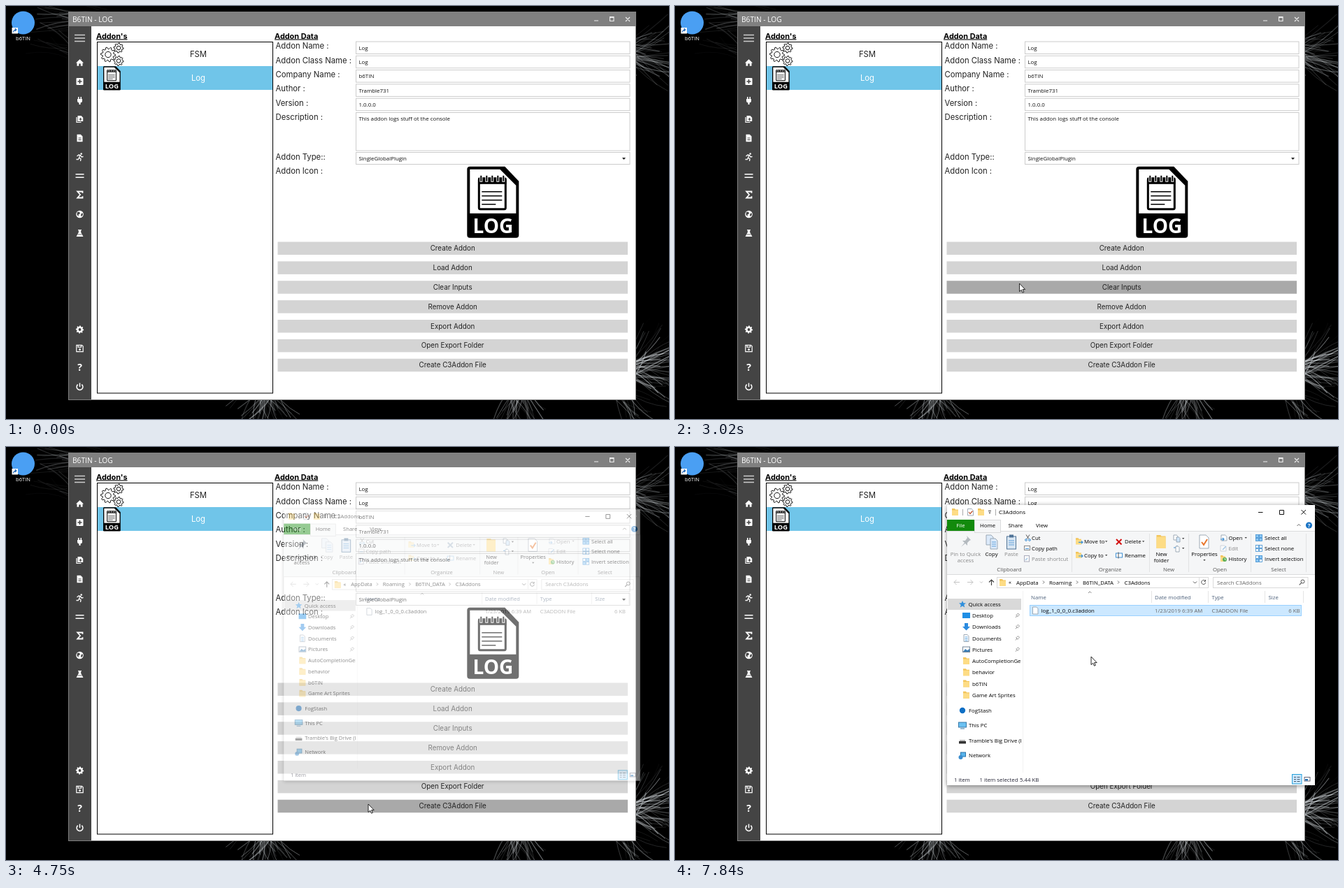
An HTML page with a canvas for the animation above (8000 ms loop, 948 by 591 pixels).

```html
<!DOCTYPE html>
<html lang="en">
<head>
<meta charset="utf-8">
<title>Addon export</title>
<style>
html,body{margin:0;width:100%;height:100%;overflow:hidden;background:#000}
canvas,svg{position:absolute;left:0;top:0}
text{font-family:"Open Sans","Noto Sans",sans-serif;white-space:pre}
svg{font-size:7.8px}
.form text{font-family:Inter,Lato,sans-serif;font-size:11.3px;fill:#222}
.form .btn{font-size:9.8px}
.form .head{font-size:10.9px;font-weight:700;text-decoration:underline;fill:#000}
.field text{font-size:7.9px;fill:#111}
.m{text-anchor:middle}
.e{text-anchor:end}
.dim,.on,.sel .off{opacity:.45}
.sel .on{opacity:1}
.cross{stroke:#4d7295}
.sel .cross{stroke:#d31111}
.frame{filter:drop-shadow(0 1px 3px rgba(0,0,0,.45))}
</style>
</head>
<body>
<canvas id="wall" width="948" height="591"></canvas>
<svg id="stage" width="948" height="591" viewBox="0 0 948 591"></svg>
<script>
const $ = id => document.getElementById(id);
const text = (x, y, s, o = '') => `<text x="${x}" y="${y}" ${o}>${s}</text>`;
const rect = (x, y, w, h, fill, o = '') => `<rect x="${x}" y="${y}" width="${w}" height="${h}" fill="${fill}" ${o}/>`;
const fill = (d, c, o = '') => `<path d="${d}" fill="${c}" ${o}/>`;
const line = (d, c, w = 1, o = '') => `<path d="${d}" fill="none" stroke="${c}" stroke-width="${w}" ${o}/>`;
const circle = (x, y, r, c, o = '') => `<circle cx="${x}" cy="${y}" r="${r}" fill="${c}" ${o}/>`;
const group = (s, o = '') => `<g ${o}>${s}</g>`;
const mid = 'class="m"';

function gear(x, y, r, teeth) {
  let d = '';
  for (let i = 0; i < teeth * 4; i++) {
    const a = i * Math.PI / 2 / teeth, q = i % 4 < 2 ? r : r * .76;
    d += (i ? 'L' : 'M') + (x + q * Math.cos(a)).toFixed(1) + ' ' + (y + q * Math.sin(a)).toFixed(1);
  }
  return d + 'Z';
}

// Wallpaper: fans of thin pale filaments
function drawWall() {
  const c = $('wall').getContext('2d');
  let seed = 7;
  const rnd = () => (seed = seed * 16807 % 2147483647) / 2147483647;
  const fan = (x, y, angle, spread, n, len, alpha) => {
    for (let i = 0; i < n; i++) {
      const a = angle + (rnd() - .5) * spread, l = len * (.4 + .6 * rnd());
      const b = a + (rnd() - .5) * .7, sx = x + (rnd() - .5) * 24, sy = y + (rnd() - .5) * 24;
      c.strokeStyle = `rgba(222,228,232,${alpha * rnd()})`;
      c.lineWidth = .4 + rnd();
      c.beginPath();
      c.moveTo(sx, sy);
      c.quadraticCurveTo(sx + l * .5 * Math.cos(b), sy + l * .5 * Math.sin(b), sx + l * Math.cos(a), sy + l * Math.sin(a));
      c.stroke();
    }
  };
  fan(135, 14, 3.2, .5, 30, 100, .25);
  fan(98, 65, 3.5, .9, 14, 70, .14);
  fan(885, 65, .1, 1.6, 60, 80, .36);
  fan(888, 520, -.2, 1.9, 70, 90, .55);
  fan(370, 548, 1.57, 2, 60, 62, .5);
  fan(730, 548, 1.4, 1.7, 45, 60, .45);
  fan(880, 555, .8, 1.2, 25, 65, .4);
}

const logIcon = fill('M4 0H54L74 21V98Q74 102 70 102H4Q0 102 0 98V4Q0 0 4 0Z', '#000') +
  fill('M4 4H47L70 27V67H4Z', '#fff') +
  rect(17, 17, 38, 44, '#fff', 'rx="2" stroke="#000" stroke-width="3"') +
  rect(16, 16, 40, 9, '#000') +
  line('M20 13v9M28 13v9M36 13v9M44 13v9M52 13v9', '#fff', 4) +
  line('M20 13v8M28 13v8M36 13v8M44 13v8M52 13v8', '#000', 2) +
  line('M21 36h29M21 42h29M21 48h29M21 54h20', '#000', 1.6) +
  text(37, 95.5, 'LOG', 'class="m" style="font-size:28px;font-weight:700;fill:#fff"');

function sidebar() {
  const W = '#fff', D = '#444';
  const icons = [
    [46, line('M-7.5-4.5h15M-7.5 0h15M-7.5 4.5h15', '#ccc', 1.5)],
    [81, fill('M-5.5.5L0-4.7 5.5.5H4V4.7H1.3V1.5H-1.3V4.7H-4V.5Z', W)],
    [108, rect(-5, -5, 10, 10, W, 'rx="1"') + line('M-3 0H3M0-3V3', D, 1.6)],
    [135, fill('M-3.5-2H3.5V1Q3.5 3 1 3.5V6H-1V3.5Q-3.5 3-3.5 1ZM-2.5-5H-1V-2H-2.5ZM1-5H2.5V-2H1Z', W)],
    [162, line('M-4.5-3V4.5H2', W, 1.2) + fill('M-3-5H2L4.7-2.3V3H-3Z', W) + line('M-1 0H3M1-2V2', D, 1.2)],
    [189, fill('M-4-5.3H1.2L4-2.5V5.3H-4Z', W) + line('M-2 0H2M-2 2.5H2', D)],
    [216, circle(2.2, -4.5, 1.3, W) + line('M-4-1L-1.5-3 1-2.5 2.5 0 5-.5M.5-2.5L-1 1 1.5 2.8 1 6M-1 1.5L-2.3 3.5H-5', W, 1.3)],
    [243, line('M-6-2.2H6M-6 2.2H6', W, 1.6)],
    [270, line('M4-2.3V-4.5H-3.3L.6 0-3.3 4.5H4V2.3', W, 1.8)],
    [298, circle(0, 0, 5.3, W) + fill('M-3.8-3L-.5-3.5.5-1-2 .5-1.5 3-4 1ZM2-1L4.5-1.5 4 2 1.5 3Z', D)],
    [325, fill('M-2.5-5H2.5V-4H1.7V-1L5 5H-5L-1.7-1V-4H-2.5Z', W) + line('M-3 2H3', D, .8)],
    [463, fill(gear(0, 0, 5.7, 8), W) + circle(0, 0, 1.9, D)],
    [490, line('M-4.7-4.7H3L4.7-3V4.7H-4.7ZM-2.5-4.5V-1.8H2V-4.5', W, 1.2) + circle(0, 1.6, 1.5, W)],
    [517, text(0, 5, '?', 'class="m" style="font-size:14px;font-weight:700" fill="#fff"')],
    [545, line('M-2.8-3.3A4.4 4.4 0 1 0 2.8-3.3M0-5.5V0', W, 1.5)]
  ];
  return rect(90, 29, 32, 534, D) + icons.map(([y, s]) => group(s, `transform="translate(105.5 ${y})"`)).join('');
}

const buttonTop = i => 337.5 + i * 27.87;

function appWindow() {
  const labels = ['Addon Name :', 'Addon Class Name :', 'Company Name :', 'Author :', 'Version :', 'Description :'];
  const values = ['Log', 'Log', 'b6TIN', 'Tramble731', '1.0.0.0', 'This addon logs stuff ot the console'];
  const buttons = ['Create Addon', 'Load Addon', 'Clear Inputs', 'Remove Addon', 'Export Addon', 'Open Export Folder', 'Create C3Addon File'];
  const box = (y, h) => rect(500.5, y, 391.5, h, '#fff', 'stroke="#ccc"');
  const form = text(129, 46.5, "Addon's", 'class="head"') + text(384, 46.5, 'Addon Data', 'class="head"') +
    labels.map((s, i) => text(385.5, 61.3 + i * 20.3, s)).join('') +
    text(385.5, 219.8, 'Addon Type::') + text(385.5, 240, 'Addon Icon :') +
    text(275, 73, 'FSM', mid) + text(275, 107, 'Log', 'class="m" style="fill:#fff"') +
    buttons.map((s, i) => rect(388.5, buttonTop(i), 500.5, 18.5, '#d4d4d4', `id="b${i}"`) +
      text(638.7, buttonTop(i) + 12.6, s, 'class="m btn"')).join('');
  const fields = values.map((s, i) => box(51 + i * 20.3, i < 5 ? 17.5 : 54.5) + text(504.5, 62.8 + i * 20.3, s)).join('') +
    box(209.5, 17) + text(504.5, 221.3, 'SingleGlobalPlugin') + fill('M881 217h5l-2.5 3z', '#222');
  const gears = [[146, 69.5, 10.5, 10], [161, 60, 7, 8], [161, 78.5, 7, 8]].map(([x, y, r, n]) =>
    line(gear(x, y, r, n), '#111') + circle(x, y, r * .4, 'none', 'stroke="#111"')).join('');
  return rect(89.5, 8.5, 811, 555, '#fff', 'id="border"') + rect(89, 8, 812, 21, '#808080', 'id="title"') +
    text(95, 22.8, 'B6TIN - LOG', 'style="font-size:10.2px" fill="#fff"') +
    line('M841 21H847M863.5 15.5H869V21.5H863.5ZM863 16.5H869M886 16L892 22M892 16L886 22', '#eee', 1.1) +
    sidebar() + rect(130.5, 51.5, 251, 502.5, '#fff', 'stroke="#000"') +
    rect(131, 86, 250, 34, '#70c5e9', 'id="row"') + gears +
    group(logIcon, 'transform="translate(139 86.3) scale(.335)"') +
    group(form, 'class="form"') + group(fields, 'class="field"') +
    group(logIcon, 'transform="translate(659.3 229.8)"');
}

const folder = (x, y, w, h) => fill(`M${x} ${y}h${w * .45}l1 1.5H${x + w}V${y + h}H${x}Z`, '#f2c55c') +
  rect(x, y + 2.5, w, h - 2.5, '#fddc85');
const page = (x, y, w, h, c = '#fff') => fill(`M${x} ${y}h${w * .7}l${w * .3} ${w * .3}V${y + h}H${x}Z`, c, 'stroke="#8a97a5" stroke-width=".8"');
const drop = (x, y) => fill(`M${x} ${y}h3.4l-1.7 2z`, '#444');

function ribbon() {
  const blue = '#3f8fd2', on = 'class="on"', dim = 'class="dim"';
  const lines = (x, y) => line(`M${x} ${y}h4M${x} ${y + 2}h4M${x} ${y + 4}h4`, blue, .7);
  const pin = group(fill('M417 127l6 6-2 1-3 3v4l-3-3-6 5 5-6-3-3h4l3-4z', '#66727d') +
    text(415.5, 156, 'Pin to Quick', mid) + text(415.5, 164.6, 'access', mid), 'class="off"');
  const copy = group(page(445, 126, 10, 14, '#dceafa') + page(451, 131, 10, 15, '#dceafa') +
    line('M453 136h6M453 139h6M453 142h6', blue, .8) + text(452.5, 156, 'Copy', mid), on);
  const paste = group(rect(474.5, 128, 13, 18, '#d9e6f2', 'stroke="#4f7396"') + rect(478, 125.5, 6, 4, '#4f7396') +
    line('M477 134h8M477 137h8M477 140h8', blue, .8) + text(481, 156, 'Paste', 'class="m dim"'));
  const cut = group(line('M502 125.5l4 6M507 125.5l-4 6', '#555') + circle(502, 133, 1.4, 'none', `stroke="${blue}"`) +
    circle(507, 133, 1.4, 'none', `stroke="${blue}"`) + text(510, 133, 'Cut'), on);
  const path = group(rect(499.5, 141.5, 8, 6, '#fff', 'stroke="#888"') + line('M501 145.5h5', blue) + text(510, 148, 'Copy path'), on);
  const shortcut = group(rect(499.5, 155.5, 7, 8.5, '#fff', 'stroke="#557"') + line('M501 162l3-3', blue, 1.4) + text(510, 162.8, 'Paste shortcut'), dim);
  const move = (y, s) => group(folder(573, y - 8, 8, 9) + line(`M577 ${y - 2}h6m-2-2l2 2-2 2`, blue, 1.2) +
    text(585, y, s) + drop(615, y - 4), on);
  const erase = group(line('M631 132l7.5 7.5M638.5 132l-7.5 7.5', '', 2, 'class="cross"') + text(643, 138.3, 'Delete') + drop(668, 134.3), on);
  const rename = group(rect(630.5, 152, 9, 6, '#fff', `stroke="${blue}"`) + line('M634 150.5v9', '#555') + text(643, 158, 'Rename'), on);
  const make = folder(688.5, 126, 13, 19) + text(695.5, 156, 'New', mid) + text(695.5, 164.6, 'folder', mid) +
    page(713, 126, 6, 7) + page(717, 129, 5, 7, '#cfe5f9') + drop(725, 130) +
    line('M713 144h5v-3', blue) + page(716, 142, 5, 8) + drop(725, 144);
  const props = page(750, 126, 13, 19) + line('M753 136l3 4 5-8', '#e8762c', 2) +
    text(757, 156, 'Properties', mid) + drop(755.3, 161);
  const open = group(page(781, 126, 8, 8) + line('M780 132h5m-2-2l2 2-2 2', blue, 1.2) + text(791.5, 133, 'Open') + drop(814.5, 129), on) +
    group(page(780, 141, 8, 8) + line('M783 147l5-5', blue, 1.5) + text(791.5, 148, 'Edit'), dim) +
    folder(780, 155, 7, 9) + circle(786, 161, 3, '#5bae58') + line('M786 159v2h2', '#fff', .7) + text(791.5, 163, 'History');
  const selects = ['Select all', 'Select none', 'Invert selection'].map((s, i) => {
    const y = 125.5 + i * 15, full = [1, 0, 1][i];
    return [0, 1, 2, 3].map(k => rect(830.5 + (k % 2) * 5, y + (k >> 1) * 5, 4, 4,
      full && (i < 2 || k % 3) ? '#8cc8f5' : '#fff', `stroke="${blue}" stroke-width=".8"`)).join('') + text(843, y + 7.6, s);
  }).join('');
  const names = [[478, 'Clipboard'], [622, 'Organize'], [706, 'New'], [779, 'Open'], [863, 'Select']];
  return rect(389, 121, 526, 61.5, '#f5f6f7') + line('M389 182.5H915M389 120.5H428.5M465.5 120.5H915', '#dadbdc') +
    line('M567.5 124V179M678.5 124V179M734.5 124V179M823.5 124V179M902.5 124V179', '#e2e3e4') +
    pin + copy + paste + cut + path + shortcut + move(138.3, 'Move to') + move(158, 'Copy to') + erase + rename + make + props + open + selects +
    names.map(([x, s]) => text(x, 178.3, s, 'class="m" fill="#555"')).join('');
}

function navPane() {
  const blue = '#2f8fdc';
  const sub = ['Desktop', 'Downloads', 'Documents', 'Pictures', 'AutoCompletionGen', 'behavior', 'b6TIN', 'Game Art Sprites'];
  const art = [rect(411, 237, 11, 8, '#1f8fe5'), fill('M414 252h5v5h3l-5.5 5.5-5.5-5.5h3z', '#2b8be0'),
    page(413, 268.5, 7, 10) + line('M414.5 272h4M414.5 274.5h4M414.5 277h4', blue, .8),
    rect(411.5, 286, 10, 7.5, '#fff', 'stroke="#789"') + fill('M412 293l3-4 3 2 3-2v4z', '#3b7fb8')];
  const items = sub.map((s, i) => {
    const y = 244 + i * 16.25;
    return (art[i] || folder(412, y - 8, 9, 10)) + text(425, y, s) +
      (i < 4 ? line(`M487 ${y}l2-2.5m-1.5-1.5l3 3m-2-3l2-2 2 2-2 2`, '#888', .9) : '');
  }).join('');
  return rect(390, 217, 105, 16, '#d9d9d9') +
    fill('M411 220l1.4 3.2 3.6.3-2.8 2.3 1 3.7-3.2-2-3.2 2 1-3.7-2.8-2.3 3.6-.3z', blue) + text(419.5, 227.8, 'Quick access') + items +
    circle(411, 377, 4.2, '#0f6fc5') + text(420, 379.6, 'FogStash') +
    rect(405.5, 394, 11, 7, '#6bc1f2', 'stroke="#3779a8"') + line('M408 403h6', '#3779a8') + text(420, 401.3, 'This PC') +
    rect(406, 421, 10, 3.5, '#333') + rect(407, 419, 8, 2, '#bbb') + text(420, 423, "Tramble's Big Drive (E:)") +
    rect(408.5, 437, 7, 6, '#58b4ec', 'stroke="#2a73a8"') + circle(408.5, 444, 3, '#3a8dcf') + text(420, 444.4, 'Network');
}

function explorer() {
  const grey = 'fill="#666"', chev = x => line(`M${x} 191.5l2 2-2 2`, '#555', .9);
  const top = rect(389, 83, 526, 401, '#fff', 'class="frame"') + folder(396, 88, 9, 10) + line('M411.5 89v9M458.5 89v9', '#aaa') +
    page(418.5, 88.5, 8, 9.5) + line('M420 93l2 2.5 3.5-4', '#c0522b', 1.2) + folder(433, 88, 9, 10) +
    line('M448 91.5h4', '#444') + drop(448.3, 93.5) + text(463, 96.3, 'C3Addons', 'style="font-size:8px"') +
    line('M834 93.5h6.5M864.5 90.5h6v6h-6zM895.5 90l6.5 6.5M902 90l-6.5 6.5', '#111') +
    rect(389, 104, 39, 16.5, '#128a0c') + text(408.5, 115, 'File', 'class="m" fill="#fff"');
  const tabs = rect(428.5, 104.5, 37, 18, '#f5f6f7', 'stroke="#dadbdc"') + text(447, 115, 'Home', mid) +
    text(487, 115, 'Share', mid) + text(524.5, 115, 'View', mid) + line('M889.5 113l2.5-2.5 2.5 2.5', '#666') +
    circle(906.5, 112, 4.6, '#1a73c4') + text(906.5, 114.8, '?', 'class="m" fill="#fff" font-weight="700"');
  const address = line('M407 193.5h-8m3.5-3.5l-3.5 3.5 3.5 3.5M418 193.5h8m-3.5-3.5l3.5 3.5-3.5 3.5M436 192.5l2 2 2-2', '#c4c4c4') +
    line('M452.5 198v-8m-3.5 3.5l3.5-3.5 3.5 3.5', '#444', 1.2) +
    rect(460.5, 186.5, 302, 15, '#fff', 'stroke="#d9d9d9"') + folder(464, 189, 9, 10) + text(477, 196.3, '«') +
    text(488, 196.5, 'AppData') + chev(526) + text(535, 196.5, 'Roaming') + chev(574) +
    text(583, 196.5, 'B6TIN_DATA') + chev(633) + text(642.5, 196.5, 'C3Addons') +
    line('M741 192.5l2.5 2.5 2.5-2.5M758 191.5a3 3 0 1 0 .7 2.5M758.5 190v2.3h-2.3', '#555') + line('M749.5 187v14', '#ddd') +
    rect(769.5, 186.5, 135.5, 15, '#fff', 'stroke="#d9d9d9"') + text(775, 196.5, 'Search C3Addons', grey) +
    circle(897.5, 192.5, 2.5, 'none', 'stroke="#555"') + line('M895.7 194.3l-3 3', '#555', 1.2);
  const list = rect(505, 205, 176, 18, '#d9ebf9', 'id="header"') +
    rect(507.5, 226.5, 388, 15, '#e5f3ff', 'id="file"') +
    line('M681.5 206V223M762.5 206V223M843.5 206V223M898.5 206V223', '#e5e5e5') +
    line('M591 209l2.2-2.2 2.2 2.2', '#777', .9) +
    [[509, 'Name'], [686, 'Date modified'], [767.5, 'Type'], [848.5, 'Size']].map(([x, s]) => text(x, 217.8, s, 'fill="#4c607a"')).join('') +
    page(511.5, 229, 7.5, 10) + text(523.5, 237, 'log_1_0_0_0.c3addon') + text(686, 237, '1/23/2019 6:39 AM', grey) +
    text(767.5, 237, 'C3ADDON File', grey) + text(893.5, 237, '6 KB', 'class="e" fill="#666"');
  const status = text(399, 478.6, '1 item', 'fill="#223"') +
    group(text(435.5, 478.6, '1 item selected', 'fill="#223"') + text(493, 478.6, '5.44 KB', 'fill="#223"'), 'id="picked"') +
    rect(882.5, 468.5, 13.5, 13.5, '#cce8ff', 'stroke="#26a0da"') + line('M885 472.5h3M885 475.5h3M885 478.5h3M889.5 472.5h4M889.5 475.5h4M889.5 478.5h4', '#456') +
    rect(900, 472.5, 8, 5.5, '#fff', 'stroke="#667"') + rect(901, 475, 4, 2.5, '#2673b5');
  return top + ribbon() + tabs + address + group(navPane(), 'clip-path="url(#nav)"') +
    line('M497.5 206V466', '#f2f2f2') + list + status;
}

const desktop = circle(24.5, 24, 16.5, '#4a9ff3') + rect(8.5, 31, 8.5, 8.5, '#fff') +
  line('M10.5 37.5Q11 34 14.5 34M12.8 32.3l2 1.7-2 2', '#1b62b5', 1.2) + text(24.5, 49.3, 'b6TIN', 'class="m" fill="#fff" font-size="7.5"');
const pointer = fill('M0 0V11.6L2.7 9.2 4.5 13.2 6.3 12.4 4.6 8.6H8.2Z', '#fff', 'stroke="#111" stroke-width=".9"') +
  circle(11.3, 5, 3, 'none', 'id="busy" stroke="#3a9fe6" stroke-width="1.9"');

drawWall();
$('stage').innerHTML = '<clipPath id="nav"><path d="M389 206H495V466H389Z"/></clipPath>' + desktop + appWindow() +
  group(explorer(), 'id="explorer"') + group(pointer, 'id="pointer"');

// Pointer path: step, x, y
const path = [[0, 464, 551], [3, 335, 430], [6, 183, 255], [9, 236.5, 167], [10, 238, 155], [14, 262, 104], [23, 262, 104],
  [30, 492.5, 397], [34, 590, 489], [36, 607.5, 508], [47, 607.5, 508], [52, 518, 511], [58, 253, 399], [59, 252.5, 392],
  [67, 252.5, 392], [70, 534, 283], [71, 534, 283], [74, 440, 250], [76, 396, 200], [78, 455, 188], [80, 540, 196],
  [82, 580, 212], [86, 590, 231], [89, 590, 231], [92, 595, 300]];

function pointerAt(n) {
  const i = path.findIndex(p => p[0] >= n);
  if (i < 1) return path[i ? path.length - 1 : 0].slice(1);
  const [a, x, y] = path[i - 1], [b, u, v] = path[i], k = (n - a) / (b - a);
  return [x + (u - x) * k, y + (v - y) * k];
}
const set = (id, name, value) => $(id).setAttribute(name, value);
const show = (id, on) => set(id, 'visibility', on ? 'visible' : 'hidden');

function draw() {
  const t = performance.now() % 8000;
  const n = Math.floor((t - 680) / 78 + .25);
  const [x, y] = pointerAt(Math.max(n, 0));
  const over = (l, tp, r, b) => n >= 0 && x >= l && x < r && y >= tp && y < b;

  show('pointer', n >= 0);
  set('pointer', 'transform', `translate(${x} ${y})`);
  set('busy', 'opacity', n >= 44 && n < 48 ? 1 : 0);

  const tone = n >= 39 && n < 50 ? '#41b1e1' : '#808080';
  set('title', 'fill', tone);
  set('border', 'stroke', tone);
  set('row', 'fill', over(131, 86, 381, 120) ? '#41b1e1' : '#70c5e9');
  for (let i = 0; i < 7; i++) {
    const hot = n < 60 && over(388, buttonTop(i), 889, buttonTop(i) + 18.5);
    set('b' + i, 'fill', hot ? n >= 39 && n < 42 ? '#8c8c8c' : '#a9a9a9' : '#d4d4d4');
  }

  const k = Math.min(1, Math.max(0, (78 * n - 3946) / 250)), s = 1 - .1 * (1 - k) ** 2;
  set('explorer', 'opacity', k);
  set('explorer', 'transform', `translate(652 283.5) scale(${s}) translate(-652 -283.5)`);
  const picked = n >= 88;
  set('explorer', 'class', picked ? 'sel' : '');
  set('picked', 'opacity', picked ? 1 : 0);
  set('header', 'opacity', n > 71 && over(505, 205, 681, 223) ? 1 : 0);
  set('file', 'opacity', picked || n > 71 && over(507, 227, 896, 242) ? 1 : 0);
  set('file', 'fill', picked ? '#cce8ff' : '#e5f3ff');
  set('file', 'stroke', picked ? '#99d1ff' : 'none');
  requestAnimationFrame(draw);
}
draw();
</script>
</body>
</html>
```
